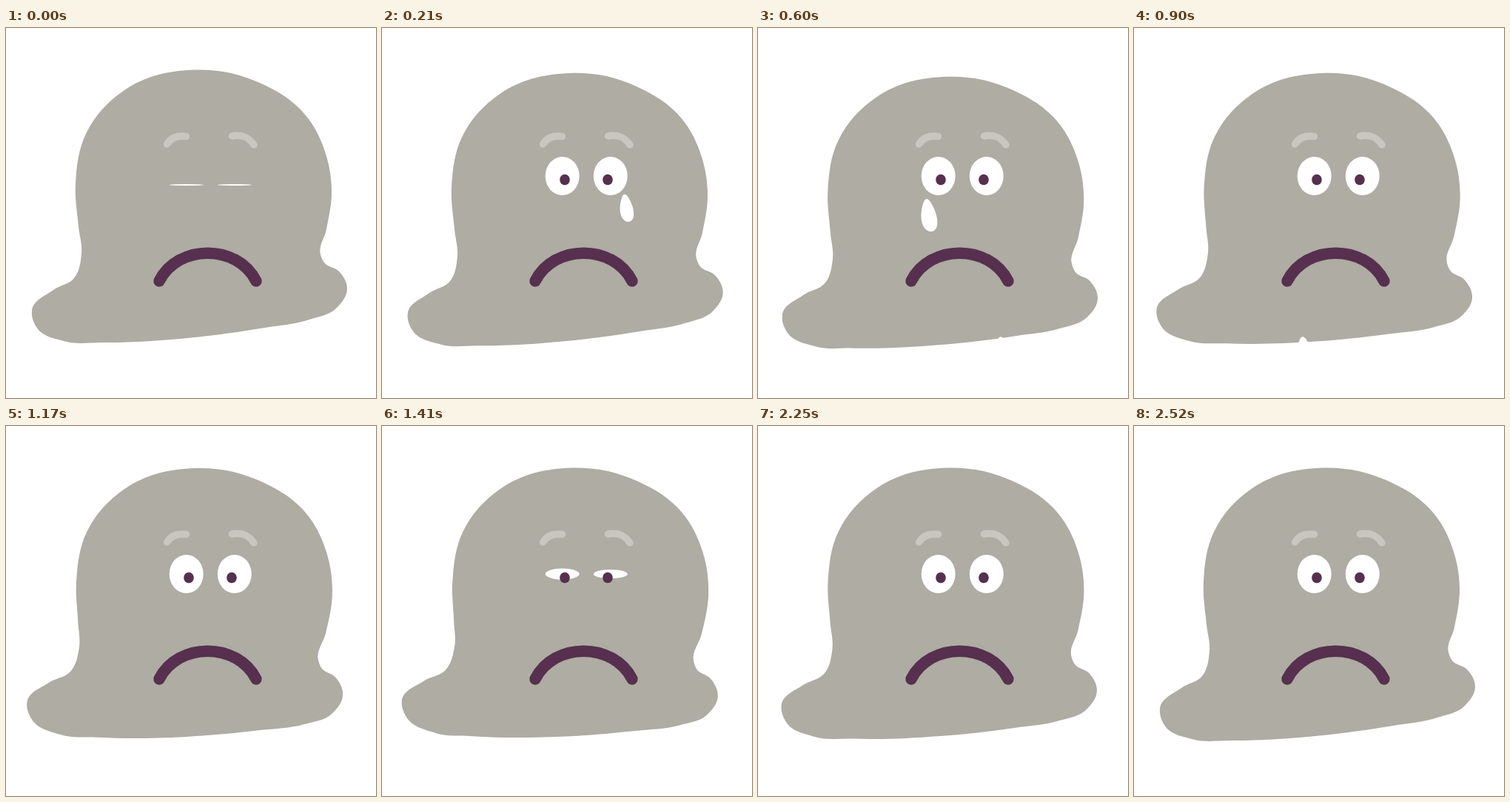
An HTML page with a canvas for the animation above (2760 ms loop, 500 by 500 pixels).

```html
<!DOCTYPE html>
<html lang="en">
<head>
<meta charset="utf-8">
<title>Sad blob</title>
<style>
  html, body { margin: 0; width: 100%; height: 100%; overflow: hidden; background: #fff; }
  canvas { display: block; width: 100vmin; height: 100vmin; }
</style>
</head>
<body>
<canvas id="stage" width="500" height="500"></canvas>
<script>
const ctx = document.getElementById('stage').getContext('2d');
const LOOP = 2760;
const STEP = 30;
const BODY = '#aeaca3', BROW = '#c8c7bf', PLUM = '#56304e', WHITE = '#fff';

// Key points of the upright body, clockwise from the top.
const OUTLINE = [
  [255, 56.5], [345, 75], [405, 118], [432, 170], [440, 220],
  [433, 272], [425, 306], [430, 317], [450, 329], [461, 352],
  [447, 378], [410, 394], [350, 405], [250, 418.5], [130, 425],
  [80, 423.5], [41, 404], [35, 382], [64, 354], [92, 338],
  [102, 305], [98, 268], [94, 210], [108, 143], [160, 84]
];

const mix = (a, b, k) => a + (b - a) * k;

function ease(v, from, to) {
  const u = Math.min(1, Math.max(0, (v - from) / (to - from)));
  return (1 - Math.cos(Math.PI * u)) / 2;
}

// Rises from 0 to 1 at the peak, then falls back.
const swell = (t, from, peak, to) => ease(t, from, peak) - ease(t, peak, to);

// Unit tangent at b of the circle through a, b and c.
function tangent(a, b, c) {
  const before = Math.hypot(b[0] - a[0], b[1] - a[1]);
  const after = Math.hypot(c[0] - b[0], c[1] - b[1]);
  const dir = [0, 1].map(i =>
    (b[i] - a[i]) * after / before + (c[i] - b[i]) * before / after);
  const length = Math.hypot(...dir);
  return dir.map(d => d / length);
}

function fillSmooth(points, color) {
  const at = i => points[(i + points.length) % points.length];
  const slopes = points.map((p, i) => tangent(at(i - 1), p, at(i + 1)));
  ctx.beginPath();
  ctx.moveTo(...points[0]);
  points.forEach((p, i) => {
    const q = at(i + 1);
    const from = slopes[i], to = slopes[(i + 1) % points.length];
    const reach = 0.35 * Math.hypot(q[0] - p[0], q[1] - p[1]);
    ctx.bezierCurveTo(
      p[0] + from[0] * reach, p[1] + from[1] * reach,
      q[0] - to[0] * reach, q[1] - to[1] * reach, ...q);
  });
  ctx.fillStyle = color;
  ctx.fill();
}

function fillEllipse(x, y, rx, ry, color) {
  ctx.beginPath();
  ctx.ellipse(x, y, rx, ry, 0, 0, 2 * Math.PI);
  ctx.fillStyle = color;
  ctx.fill();
}

function strokeCurve(x, y, curve, width, color) {
  ctx.beginPath();
  ctx.moveTo(x, y);
  ctx.bezierCurveTo(...curve);
  ctx.lineWidth = width;
  ctx.lineCap = 'round';
  ctx.strokeStyle = color;
  ctx.stroke();
}

// The foot slides left and tilts clockwise while the head stays in place.
function drawBody(t) {
  const slump = swell(t, 0, 1860, 2520);
  const drop = 10 * swell(t, 0, 450, 1290);
  fillSmooth(OUTLINE.map(([x, y]) => [
    x + slump * (1.5 - 11 * ease(y, 210, 390)),
    y + slump * 0.067 * (x - 230) * ease(y, 200, 300) + drop
  ]), BODY);
}

function drawTear(t, x, start) {
  const age = t - start;
  const size = ease(age, -90, 0);
  if (!size) return;
  const fall = Math.max(0, age);
  const top = 224.6 + 0.00143 * fall * fall;
  ctx.beginPath();
  for (let a = 0; a < 2 * Math.PI; a += 0.1) {
    const down = (1 - Math.cos(a)) / 2;
    const side = 10.3 * Math.sin(a) * (1 - 0.3 * Math.cos(a));
    ctx.lineTo(x + size * (5.5 * down + side), top + size * 44 * down);
  }
  ctx.fillStyle = WHITE;
  ctx.fill();
}

function drawEye(t, x, pupilX, squint) {
  const open = ease(t, 0, 210);
  const blink = swell(t, 1260, 1410, 1560);
  const height = mix(mix(1, 26, open), squint, blink);
  fillEllipse(x, mix(212, 200, open), 23, height, WHITE);
  fillEllipse(pupilX, 205, 6.8, 7.3 * Math.min(1, open * 3), PLUM);
}

function draw(t) {
  ctx.fillStyle = WHITE;
  ctx.fillRect(0, 0, 500, 500);
  drawBody(t);
  strokeCurve(217.5, 157, [223, 148, 232, 145, 243.5, 146.5], 9.5, BROW);
  strokeCurve(305.5, 146, [318, 143.5, 329, 148, 335, 158], 9.5, BROW);
  strokeCurve(207, 342, [232, 291.5, 313, 291.5, 338, 342], 15.5, PLUM);
  drawTear(t, 328, 233);
  drawTear(t, 228, 533);
  drawEye(t, 243.7, 247, 7.5);
  drawEye(t, 308.8, 305, 6);
}

function tick(now) {
  draw(Math.floor(now % LOOP / STEP) * STEP);
  requestAnimationFrame(tick);
}
requestAnimationFrame(tick);
</script>
</body>
</html>
```
